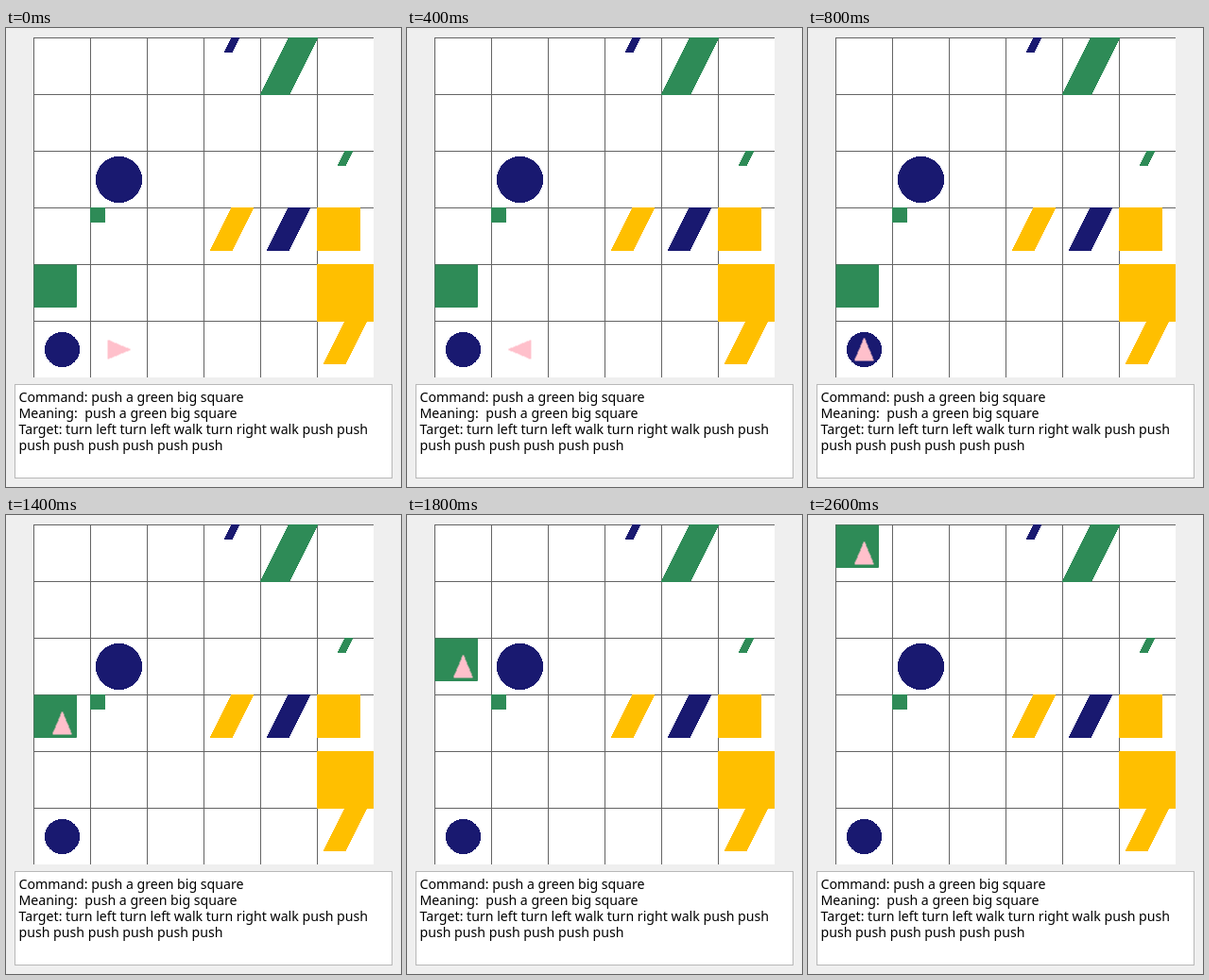
An HTML page that plays this animation: 418x486 px, repeating every 2.8 s.

```html
<!DOCTYPE html>
<html lang="en">
<head>
<meta charset="utf-8">
<title>Grid world</title>
<style>
  html, body { margin: 0; width: 100%; height: 100%; overflow: hidden; background: #efefef; }
  svg { display: block; }
  .shapes { shape-rendering: crispEdges; stroke-linejoin: bevel; }
  text { font: 14.15px "Noto Sans", "Open Sans", sans-serif; white-space: pre; }
</style>
</head>
<body>
<svg width="418" height="486" viewBox="0 0 418 486">
  <clipPath id="view"><rect x="29" y="10" width="360" height="360"/></clipPath>
  <rect x="29" y="10" width="360" height="360" fill="#fff"/>
  <g clip-path="url(#view)">
    <g id="grid" class="shapes" transform="translate(29.5 10.5)"></g>
  </g>
  <rect x="9.5" y="377.5" width="399" height="99" fill="#fff" stroke="#b8b8b8"/>
  <g id="log"></g>
</svg>
<script>
const CELL = 60, COUNT = 6, LOOP = 2800;
const GREEN = '#2e8b57', NAVY = '#191970', YELLOW = '#ffbf00', PINK = '#ffc0cb';
const grid = document.getElementById('grid');
const log = document.getElementById('log');

function add(parent, tag, attrs) {
  const el = document.createElementNS('http://www.w3.org/2000/svg', tag);
  for (const key in attrs) el.setAttribute(key, attrs[key]);
  return parent.appendChild(el);
}

const paint = color => ({ fill: color, stroke: color });

function square(col, row, size, color) {
  return add(grid, 'rect', { x: col * CELL, y: row * CELL, width: size, height: size, ...paint(color) });
}

function circle(col, row, r, color) {
  add(grid, 'circle', { cx: (col + 0.5) * CELL, cy: (row + 0.5) * CELL, r, ...paint(color) });
}

function slant(col, row, size, color) {
  const x = col * CELL + Math.floor((CELL - size) / 2), y = row * CELL, half = size / 2;
  add(grid, 'path', {
    d: `M${x} ${y + size}L${x + half} ${y}h${half}L${x + half} ${y + size}z`, ...paint(color)
  });
}

// Each step is [start time, transform], held until the next one.
function play(el, steps) {
  const frames = steps.map(([t, transform]) => ({ offset: t / LOOP, transform, easing: 'step-end' }));
  frames.push({ offset: 1, transform: steps[steps.length - 1][1] });
  el.animate(frames, { duration: LOOP, iterations: Infinity });
}

for (let i = 0; i <= COUNT; i++) {
  const p = i * CELL, end = COUNT * CELL;
  add(grid, 'path', { d: `M${p} -.5V${end}M-.5 ${p}H${end}`, stroke: '#646464', fill: 'none' });
}

slant(3, 0, 15, NAVY);
slant(4, 0, 60, GREEN);
circle(1, 2, 24, NAVY);
slant(5, 2, 15, GREEN);
square(1, 3, 15, GREEN);
slant(3, 3, 45, YELLOW);
slant(4, 3, 45, NAVY);
square(5, 3, 45, YELLOW);
square(5, 4, 60, YELLOW);
circle(0, 5, 18, NAVY);
slant(5, 5, 45, YELLOW);
const box = square(0, 4, 45, GREEN);
const agent = add(grid, 'path', { d: 'M-12 -10L12 0L-12 10z', ...paint(PINK) });

const pose = (col, row, angle) =>
  `translate(${(col + 0.5) * CELL}px, ${(row + 0.5) * CELL}px) rotate(${angle}deg)`;
const pushes = [1000, 1400, 1800, 2200, 2600];

play(agent, [
  [0, pose(1, 5, 0)],
  [200, pose(1, 5, -90)],
  [400, pose(1, 5, -180)],
  [600, pose(0, 5, -180)],
  [800, pose(0, 5, -90)],
  ...pushes.map((t, i) => [t, pose(0, 4 - i, -90)])
]);
play(box, [
  [0, 'translate(0px, 0px)'],
  ...pushes.map((t, i) => [t, `translate(0px, ${-i * CELL}px)`])
]);

[
  'Command: push a green big square',
  'Meaning:  push a green big square',
  'Target: turn left turn left walk turn right walk push push',
  'push push push push push push'
].forEach((line, i) => {
  add(log, 'text', { x: 13.5, y: 396 + 17 * i }).textContent = line;
});
</script>
</body>
</html>
```
